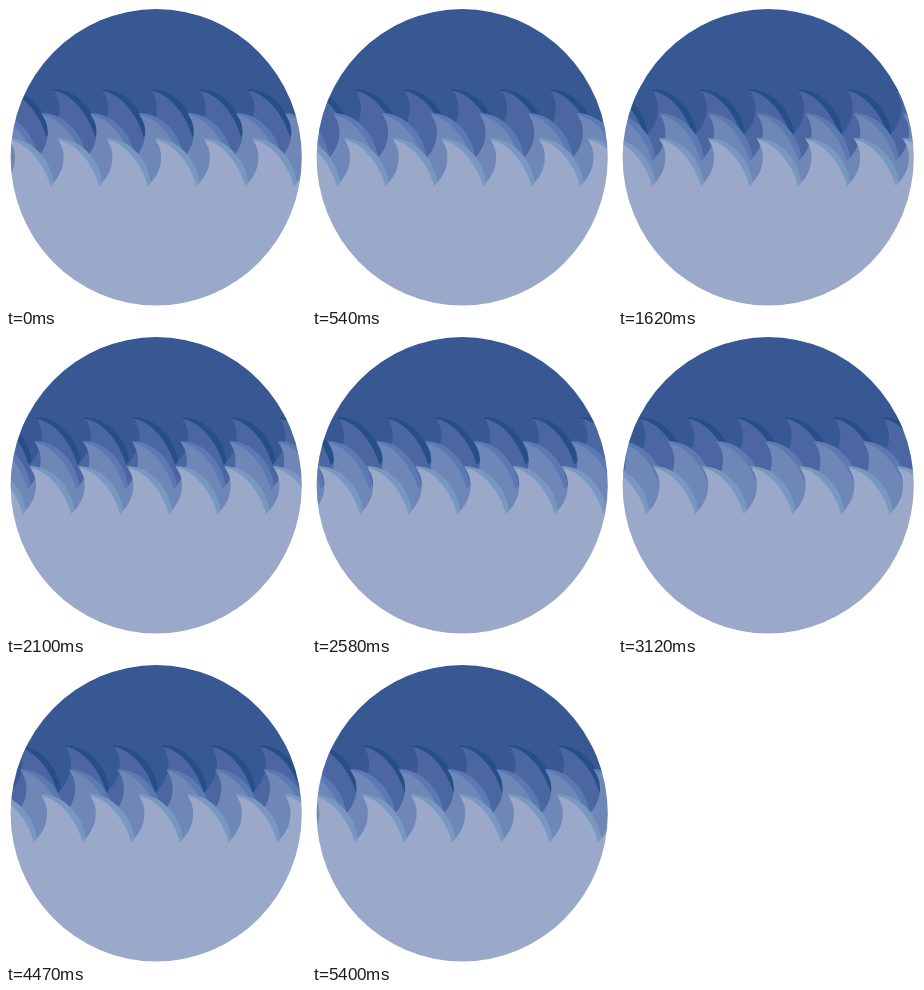
These frames come from a looping animation (300 by 300 pixels, 8 s). An HTML page:

```html
<!DOCTYPE html>
<html lang="en">
<head>
<meta charset="utf-8">
<title>Waves</title>
<style>
  html, body { margin: 0; width: 100%; height: 100%; overflow: hidden; background: #fff; }
  svg { display: block; width: 100vw; height: 100vh; }
</style>
</head>
<body>
<svg id="stage" viewBox="0 0 300 300">
  <rect width="300" height="300" fill="#385894"/>
  <g id="sea"></g>
  <!-- white surround with a round opening -->
  <path fill="#fff" fill-rule="evenodd"
    d="M-5 -5H305V305H-5ZM4.6 151.3a145.6 148.3 0 0 1 291.2 0a145.6 148.3 0 0 1 -291.2 0Z"/>
</svg>
<script>
const LOOP = 8000, STEP = 30, MOTION_END = 5400;
const PERIOD = 48.7, FINS = 9;

// x: first crest at time zero; speed in px per ms
const layers = [
  { x: 47, y: 83, speed: -0.00833, body: '#4b66a1', edge: '#264f88' },
  { x: 35.3, y: 107, speed: -0.02656, body: '#6f87b6', edge: '#5b7ab4' },
  { x: 51.2, y: 132, speed: -0.0364, body: '#9aa8c9', edge: '#7898c1' }
];

function addPath(parent, d, fill) {
  const path = document.createElementNS('http://www.w3.org/2000/svg', 'path');
  path.setAttribute('d', d);
  path.setAttribute('fill', fill);
  parent.append(path);
}

function wavePaths() {
  let edge = '', body = `M${42 - PERIOD} 48`;
  for (let i = 0; i < FINS; i++) {
    const x = i * PERIOD;
    edge += `M${x} 0C${x + 22} 0 ${x + 42} 20 ${x + 45} 44L${x + 42} 48L${x + 5} 9Z`;
    body += `C${x + 11} 31 ${x + 8} 11 ${x + 1} 2C${x + 17} 4 ${x + 35} 23 ${x + 42} 48`;
  }
  body += `V220H${42 - PERIOD}Z`;
  return { edge, body };
}

const shapes = wavePaths();
const sea = document.getElementById('sea');
for (const layer of layers) {
  layer.group = document.createElementNS('http://www.w3.org/2000/svg', 'g');
  addPath(layer.group, shapes.edge, layer.edge);
  addPath(layer.group, shapes.body, layer.body);
  sea.append(layer.group);
}

function render(time) {
  const t = Math.min(Math.floor(time / STEP) * STEP, MOTION_END);
  for (const { group, x, y, speed } of layers) {
    const shift = (x + speed * t) % PERIOD;
    const wrapped = (shift + PERIOD) % PERIOD - 2 * PERIOD;
    group.setAttribute('transform', `translate(${wrapped.toFixed(2)} ${y})`);
  }
}

const start = performance.now();
function tick() {
  render((performance.now() - start) % LOOP);
  requestAnimationFrame(tick);
}
tick();
</script>
</body>
</html>
```
